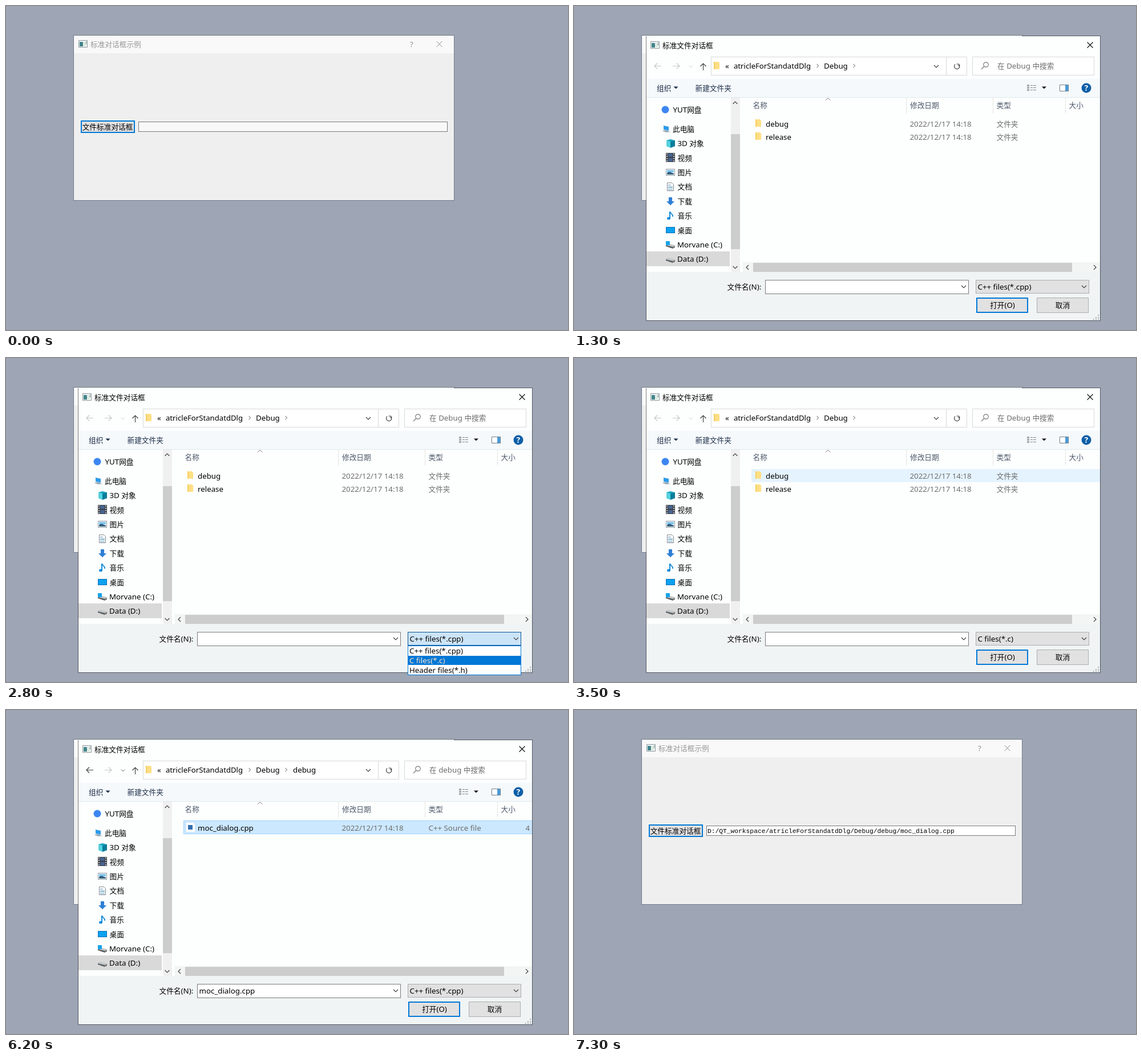
An HTML page for the animation above (7400 ms loop, 985x569 px).

```html
<!DOCTYPE html>
<html lang="zh-CN">
<head>
<meta charset="utf-8">
<title>标准对话框示例</title>
<style>
  html, body { margin: 0; width: 100%; height: 100%; overflow: hidden; background: #9ea6b5; }
  svg { display: block; }
  text { font: 13.3px "Noto Sans", "Open Sans", sans-serif; fill: #000; white-space: pre; }
  .c { font: 12.7px "Noto Sans CJK SC", "Noto Sans CJK", sans-serif; }
  .mono { font: 11.28px "Liberation Mono", monospace; }
  .soft { fill: #6d6d6d; }
  .head text { fill: #4c5869; }
  .bar text { fill: #1e2f48; }
  .mid { text-anchor: middle; }
  .line { fill: none; stroke: #444; stroke-width: 1.2; }
  .pale { stroke: #c8c8c8; }
  .box { fill: #fff; stroke: #d9d9d9; }
  .btn { fill: #e1e1e1; stroke: #adadad; }
  .hot { fill: #e5f1fb; stroke: #0078d7; }
  .down { fill: #cce4f7; stroke: #005499; }
  .default { fill: #e1e1e1; stroke: #0078d7; stroke-width: 2; }
  .hover { fill: #e5f3ff; }
  .picked { fill: #cce8ff; stroke: #99d1ff; }
  .inv { fill: #fff; }
</style>
</head>
<body>
<svg width="985" height="569" viewBox="0 0 985 569">
  <defs>
    <g id="app">
      <path d="M.5.5h15v12H.5z" fill="#f4f8f6" stroke="#8b959b"/>
      <path d="M2 3h6v8H2z" fill="#43858c"/>
      <path d="M9 3h4v8H9z" fill="#dcebe0"/>
      <path d="M13 2h1v5h-1z" fill="#78868b"/>
    </g>
    <g id="folder">
      <path d="M0 0h8l2 2v11H0z" fill="#ffdf85"/>
      <path d="M0 0h2v13H0z" fill="#f6cf62"/>
    </g>
    <path id="right" d="M-2-4 2 0-2 4"/>
    <path id="below" d="M-4-2 0 2 4-2"/>
    <path id="above" d="M-4 2 0-2 4 2"/>
    <path id="cross" d="M-5-5 5 5M5-5-5 5"/>
    <path id="tri" d="M-4-2h8l-4 4z"/>
    <g id="drive">
      <path d="M0 6 4 4l12 3v3l-3 2L0 8z" fill="#c4c8ca"/>
      <path d="M0 7 12 10v3L0 9z" fill="#565b60"/>
      <path d="M12 10l4-2v3l-4 2z" fill="#777"/>
    </g>
    <clipPath id="listArea"><rect x="704" y="505" width="199" height="53"/></clipPath>
  </defs>

  <rect width="985" height="569" fill="#9ea6b5"/>

  <!-- main window -->
  <rect x="118.5" y="51.5" width="667" height="290" fill="#efefef"/>
  <path d="M119 52h666v31H119z" fill="#f9f9f9"/>
  <path d="M119 52h666v31H119z" fill="#fff" data-on="700-1000 6500-7300"/>
  <rect x="118.5" y="51.5" width="667" height="290" fill="none" stroke="#737b88"/>
  <rect x="118.5" y="51.5" width="667" height="290" fill="none" stroke="#4d5560" data-on="700-1000 6500-7300"/>
  <use href="#app" x="127" y="60"/>
  <g data-on="0-700 1000-6500 7300-7400">
    <text class="c" x="148" y="71.7" style="fill:#969696">标准对话框示例</text>
    <text class="mid" x="711" y="72" style="fill:#8c8c8c">?</text>
    <use href="#cross" x="759.5" y="67" class="line" style="stroke:#8c8c8c;stroke-width:1"/>
  </g>
  <g data-on="700-1000 6500-7300">
    <text class="c" x="148" y="71.7">标准对话框示例</text>
    <text class="mid" x="711" y="72">?</text>
    <use href="#cross" x="759.5" y="67" class="line" style="stroke:#000;stroke-width:1"/>
  </g>
  <rect class="default" x="132" y="202" width="93" height="20"/>
  <rect class="hot" x="131.5" y="201.5" width="94" height="21" data-on="600-700 900-1000"/>
  <rect class="down" x="131.5" y="201.5" width="94" height="21" data-on="700-900"/>
  <rect x="131.5" y="201.5" width="94" height="21" fill="#dbecf9" stroke="#1071bd" data-on="1000-6500"/>
  <text class="c" x="133.7" y="217">文件标准对话框</text>
  <rect x="232.5" y="203.5" width="541" height="17" fill="#f8f8f8" stroke="#7a7a7a"/>
  <rect x="232.5" y="203.5" width="541" height="17" fill="#fff" stroke="#7a7a7a" data-on="6500-7400"/>
  <rect x="232.5" y="203.5" width="541" height="17" fill="none" stroke="#333" data-on="300-400 7000-7100"/>
  <text class="mono" x="234" y="216" data-on="6500-7400">D:/QT_workspace/atricleForStandatdDlg/Debug/debug/moc_dialog.cpp</text>

  <!-- file dialog -->
  <g id="dialog" data-on="1200-6500">
    <path d="M127 53h795v499H127z" fill="#fdfefe"/>
    <path d="M127 128h795v32H127z" fill="#f5f9fc"/>
    <path d="M127 467h795v85H127z" fill="#f1f4f5"/>
    <path d="M127 160.5h795" stroke="#e1e7ec"/>
    <use href="#app" x="134" y="62"/>
    <text class="c" x="155" y="73.7">标准文件对话框</text>
    <use href="#cross" x="904.5" y="68.5" class="line" style="stroke:#111"/>

    <!-- address row -->
    <g class="line pale">
      <path d="M153 105.5h-12m5-5-5 5 5 5" data-on="1200-3900"/>
      <path d="M173 105.5h12m-5-5 5 5-5 5"/>
      <use href="#below" transform="translate(205 106) scale(.75)" data-on="1200-3900"/>
    </g>
    <g class="line" data-on="3900-6500">
      <path d="M153 105.5h-12m5-5-5 5 5 5"/>
      <use href="#below" transform="translate(205 106) scale(.75)"/>
    </g>
    <path class="line" d="M226.5 113v-12m-5 5 5-5 5 5"/>
    <rect class="box" x="240.5" y="89.5" width="448" height="32"/>
    <path d="M652.5 90v31" stroke="#d9d9d9"/>
    <rect class="box" x="698.5" y="89.5" width="213" height="32"/>
    <use href="#folder" x="245" y="98"/>
    <text x="265" y="110">«</text>
    <text x="280" y="110" style="font-size:13.15px">atricleForStandatdDlg</text>
    <text x="438" y="110">Debug</text>
    <g class="line">
      <use href="#right" transform="translate(427 105) scale(.8)"/>
      <use href="#right" transform="translate(491 105) scale(.8)"/>
      <use href="#below" x="635" y="106"/>
      <path d="M674.5 102.5a4.7 4.7 0 1 1-6.6 0M674.5 106v-4h-4"/>
      <path d="M719 106l-5 5" stroke="#777"/>
      <circle cx="722" cy="103" r="4.2" stroke="#777"/>
    </g>
    <text x="503" y="110" data-on="3900-6500">debug</text>
    <text class="soft" x="742" y="110" data-on="1200-3900"><tspan class="c">在</tspan> Debug <tspan class="c">中搜索</tspan></text>
    <text class="soft" x="742" y="110" data-on="3900-6500"><tspan class="c">在</tspan> debug <tspan class="c">中搜索</tspan></text>

    <!-- toolbar -->
    <g class="bar">
      <text class="c" x="145" y="148.7">组织</text>
      <text class="c" x="212.5" y="148.7">新建文件夹</text>
      <use href="#tri" x="178.5" y="143.5" fill="#1e2f48"/>
      <use href="#tri" x="824" y="143.5" fill="#111"/>
      <path d="M794.5 138.5h3v2h-3zm0 4h3v2h-3zm0 4h3v2h-3z" fill="#fff" stroke="#7c858e"/>
      <path d="M800 139.5h4m1 0h5m-10 4h4m1 0h5m-10 4h4m1 0h5" stroke="#7c858e"/>
      <rect x="851.5" y="138.5" width="15" height="11" fill="#fff" stroke="#71808f"/>
      <path d="M861 139h5v10h-5z" fill="#4a9bd8"/>
      <circle cx="898" cy="144" r="8.5" fill="#0c5ea8"/>
      <text class="mid" x="898" y="149" style="fill:#fff;font-weight:700">?</text>
    </g>

    <!-- navigation tree -->
    <path d="M275 161h16v306h-16z" fill="#f0f0f0"/>
    <path d="M275 225h16v202h-16z" fill="#cdcdcd"/>
    <path d="M127 431h146v26H127z" fill="#d9d9d9"/>
    <g class="line">
      <use href="#above" x="282.5" y="170"/>
      <use href="#below" x="282.5" y="459"/>
    </g>
    <g id="chevrons" class="line" data-on="1400-2200">
      <use href="#below" x="138.5" y="216"/>
      <use href="#right" x="138.5" y="182.5" style="stroke:#b8b8b8"/>
      <g id="childChevrons" style="stroke:#b8b8b8"></g>
    </g>
    <circle cx="160" cy="182" r="6.5" fill="#3c86f2"/>
    <g>
      <path d="M157 210l9 2v7l-9-2z" fill="#2d9be8"/>
      <path d="M154 219l7-1 8 3-7 1z" fill="#9aa7b2"/>
      <path d="M162 236l7-2 8 2v10l-8 3-7-3z" fill="#19a5c0"/>
      <path d="M162 236l7 2v11l-7-3z" fill="#53d2de"/>
      <path d="M169 238l8-2v10l-8 3z" fill="#087e9b"/>
      <path d="M161 258h16v16h-16z" fill="#3b4046"/>
      <path d="M165 259h8v6h-8zm0 8h8v6h-8z" fill="#46648e"/>
      <path d="M163 259v15m12-15v15" stroke="#ccc" stroke-width="2" stroke-dasharray="2 2"/>
      <rect x="161.5" y="286.5" width="15" height="11" fill="#fff" stroke="#8e999f"/>
      <path d="M163 288h12v4h-12z" fill="#7dc4ef"/>
      <path d="M163 293l4-2 8 3v2h-12z" fill="#315f7d"/>
      <path d="M163.5 310.5h8l3 3v11h-11z" fill="#fff" stroke="#7e8b93"/>
      <path d="M165 314.5h5m-5 3h8m-8 2h8m-8 3h8" stroke="#5e9ab8"/>
      <path d="M166 336h6v7h4l-7 7-7-7h4z" fill="#2f7fd6"/>
      <path d="M168 361v11" stroke="#118bdb" stroke-width="2"/>
      <path d="M168 361c1 4 6 4 5 9" fill="none" stroke="#118bdb" stroke-width="1.7"/>
      <ellipse cx="166" cy="373" rx="3" ry="2.3" fill="#118bdb"/>
      <rect x="161.5" y="388.5" width="15" height="10" fill="#0ea0f2" stroke="#0874b8"/>
      <use href="#drive" x="161" y="413"/>
      <path d="M161 413h7v7h-7z" fill="#16a4e8"/>
      <use href="#drive" x="161" y="438"/>
    </g>
    <text x="173.5" y="187">YUT<tspan class="c">网盘</tspan></text>
    <text class="c" x="173" y="220.7">此电脑</text>
    <text x="181.5" y="246">3D <tspan class="c">对象</tspan></text>
    <text class="c" x="181.5" y="271.5">视频</text>
    <text class="c" x="181.5" y="296.7">图片</text>
    <text class="c" x="181.5" y="322.3">文档</text>
    <text class="c" x="181.5" y="347.5">下载</text>
    <text class="c" x="181.5" y="373">音乐</text>
    <text class="c" x="181.5" y="398.5">桌面</text>
    <text x="181" y="424">Morvane (C:)</text>
    <text x="181" y="449">Data (D:)</text>

    <!-- file list -->
    <g class="head">
      <path d="M582.5 161v28m152-28v28m127-28v28" stroke="#e5e5e5"/>
      <use href="#above" x="445" y="163.5" class="line" style="stroke:#777;stroke-width:1"/>
      <text class="c" x="313.5" y="179">名称</text>
      <text class="c" x="589" y="179">修改日期</text>
      <text class="c" x="740.5" y="179">类型</text>
      <text class="c" x="867.5" y="179">大小</text>
    </g>
    <rect class="hover" x="311" y="218" width="611" height="23" data-on="1500-2000"/>
    <rect class="hover" x="311" y="195" width="611" height="23" opacity=".5" data-on="3400-3500 5900-6000"/>
    <rect class="hover" x="311" y="195" width="611" height="23" data-on="3500-3700 6000-6200"/>
    <path class="picked" d="M922 194.5H311.5v23H922" data-on="3700-3900 6200-6500"/>
    <g data-on="1300-3900">
      <use href="#folder" x="318" y="199"/>
      <text x="336" y="212">debug</text>
      <text class="soft" x="588.5" y="212">2022/12/17 14:18</text>
      <text class="soft c" x="740.5" y="211.5">文件夹</text>
      <use href="#folder" x="318" y="222"/>
      <text x="336" y="235">release</text>
      <text class="soft" x="588.5" y="235">2022/12/17 14:18</text>
      <text class="soft c" x="740.5" y="234.5">文件夹</text>
    </g>
    <text class="soft c" x="532.5" y="217.5" data-on="3900-5300">没有与搜索条件匹配的项。</text>
    <g data-on="5300-6500">
      <path d="M316 198h12l3 3v13h-15z" fill="#fff"/>
      <path d="M319 202h8v8h-8z" fill="#356fb0"/>
      <text x="336" y="212">moc_dialog.cpp</text>
      <text class="soft" x="588.5" y="212">2022/12/17 14:18</text>
      <text class="soft" x="740.5" y="212">C++ Source file</text>
      <text class="soft" x="910.5" y="212">4</text>
    </g>
    <path d="M296 450h626v17H296z" fill="#f3f4f4"/>
    <path d="M314 451h559v16H314z" fill="#cdcdcd"/>
    <g class="line">
      <use href="#right" transform="translate(304 459) scale(-1 1)"/>
      <use href="#right" x="913" y="459"/>
    </g>

    <!-- file name, filter, buttons -->
    <text x="268.5" y="498"><tspan class="c">文件名</tspan>(N):</text>
    <rect x="335.5" y="481.5" width="356" height="24" fill="#fff" stroke="#7a7a7a"/>
    <rect x="335.5" y="481.5" width="356" height="24" fill="none" stroke="#0078d7" data-on="1400-2800"/>
    <path d="M339.5 485v17" stroke="#000" data-on="1400-1900 2400-2800"/>
    <text x="338.5" y="498" data-on="6200-6500">moc_dialog.cpp</text>
    <rect class="btn" x="704.5" y="481.5" width="198" height="23"/>
    <rect class="hot" x="704.5" y="481.5" width="198" height="23" data-on="2100-2400 3100-3400 4400-4700 5300-5500"/>
    <rect class="down" x="704.5" y="481.5" width="198" height="23" data-on="2400-3100 4700-5300"/>
    <text x="707.5" y="498" data-on="1200-3000 5200-6500">C++ files(*.cpp)</text>
    <text x="707.5" y="498" data-on="3000-5200">C files(*.c)</text>
    <g class="line">
      <use href="#below" x="683" y="493"/>
      <use href="#below" x="894" y="493"/>
    </g>
    <rect class="default" x="706" y="513" width="89" height="25"/>
    <rect class="down" x="705.5" y="512.5" width="90" height="26" data-on="6400-6500"/>
    <text class="mid" x="751" y="530"><tspan class="c">打开</tspan>(O)</text>
    <rect class="btn" x="811.5" y="512.5" width="90" height="26"/>
    <text class="c mid" x="856.5" y="530">取消</text>
    <path d="M918 543h2m-6 4h2m2 0h2m-10 3h2m2 0h2m2 0h2" stroke="#aeb3b7" stroke-width="2"/>
    <!-- the top edge stays light where it lies on the main window -->
    <path d="M785 52.5H922.5V552.5H126.5V53" fill="none" stroke="#000" stroke-opacity=".47"/>
  </g>

  <!-- filter list -->
  <g clip-path="url(#listArea)" data-on="2500-3000 4600-5200">
    <g id="list">
      <rect x="704.5" y="505.5" width="198" height="51" fill="#fff" stroke="#0078d7"/>
      <path d="M705 506h197v17H705z" fill="#0078d7" data-on="2500-2800 4900-5200"/>
      <path d="M705 523h197v16H705z" fill="#0078d7" data-on="2800-3000 4600-4900"/>
      <text x="707" y="519">C++ files(*.cpp)</text>
      <text x="707" y="536">C files(*.c)</text>
      <text x="707" y="553">Header files(*.h)</text>
      <text class="inv" x="707" y="519" data-on="2500-2800 4900-5200">C++ files(*.cpp)</text>
      <text class="inv" x="707" y="536" data-on="2800-3000 4600-4900">C files(*.c)</text>
    </g>
  </g>
</svg>
<script>
  const LOOP = 7400, STEP = 100;
  const byId = id => document.getElementById(id);
  const dialog = byId('dialog'), chevrons = byId('chevrons'), list = byId('list');

  // One chevron per child of the computer node
  byId('childChevrons').innerHTML = Array.from({ length: 9 }, (_, i) =>
    `<use href="#right" x="147" y="${241.5 + i * 25.4}"/>`).join('');

  const timed = [...document.querySelectorAll('[data-on]')].map(el => ({
    el, spans: el.dataset.on.split(' ').map(s => s.split('-').map(Number))
  }));

  function draw(t) {
    for (const { el, spans } of timed) {
      const on = spans.some(([from, to]) => t >= from && t < to);
      el.style.display = on ? '' : 'none';
    }
    dialog.style.opacity = t === 1200 ? 0.6 : t === 6400 ? 0.5 : 1;
    chevrons.style.opacity = Math.min(1, Math.max(0, (2200 - t) / 500));
    const sliding = t === 2500 || t === 4600;
    list.setAttribute('transform', `translate(0 ${sliding ? -28 : 0})`);
  }

  const start = performance.now();
  function tick() {
    const t = (performance.now() - start) % LOOP;
    draw(Math.floor(t / STEP) * STEP);
    requestAnimationFrame(tick);
  }
  draw(0);
  requestAnimationFrame(tick);
</script>
</body>
</html>
```
